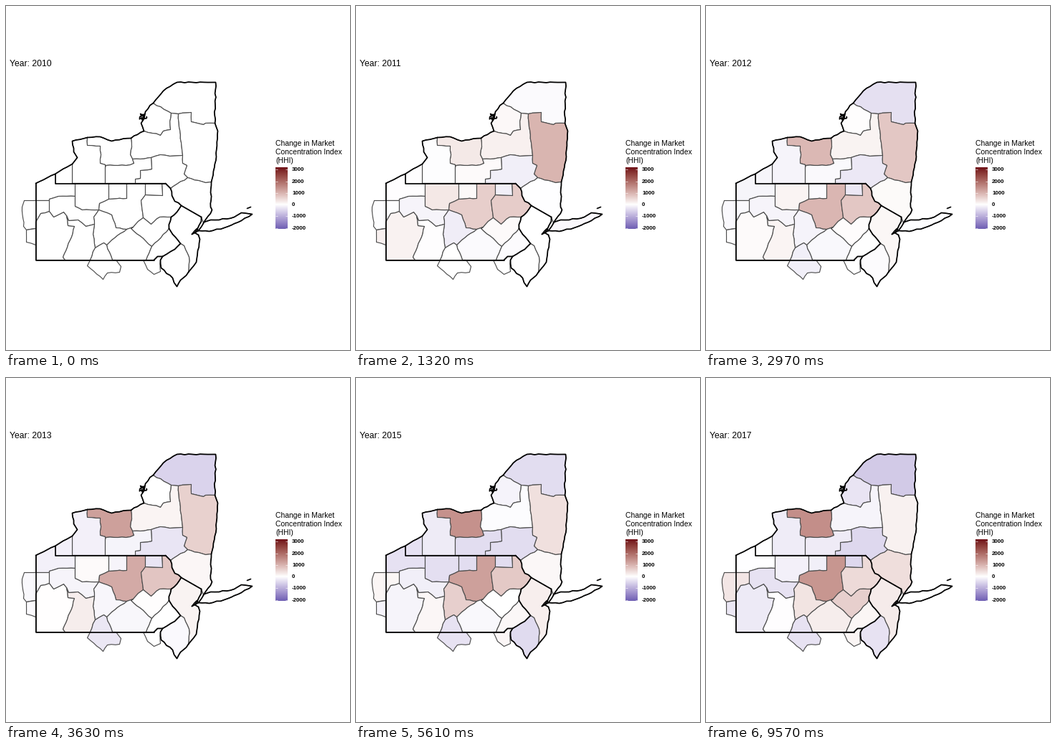
Write a matplotlib script that moves like this. It is 480 px wide and 480 px high and loops after 9.9 s.

```python
import numpy as np
import matplotlib.pyplot as plt
from matplotlib.animation import FuncAnimation
from matplotlib.patches import Polygon

SIZE, DPI = 480, 100
PX = 72 / DPI
FRAMES, YEARS = 30, 8
TOP, BOTTOM = 3215, -2080
WHITE = np.array([100, 0, 0])
HIGH = np.array([23, 41, 23])
LOW = np.array([16, 41, -66])
rng = np.random.default_rng(7)

fig = plt.figure(figsize=(SIZE / DPI, SIZE / DPI), dpi=DPI, facecolor="white")
ax = fig.add_axes([0, 0, 1, 1])


def lab_to_rgb(lab):
    fy = (lab[0] + 16) / 116
    f = np.array([fy + lab[1] / 500, fy, fy - lab[2] / 200])
    xyz = np.where(f > 6 / 29, f ** 3, (f - 4 / 29) * 3 * (6 / 29) ** 2)
    xyz = xyz * [0.9505, 1.0, 1.089]
    rgb = np.array([[3.2406, -1.5372, -0.4986],
                    [-0.9689, 1.8758, 0.0415],
                    [0.0557, -0.2040, 1.0570]]) @ xyz
    rgb = np.clip(rgb, 0, 1)
    rgb = np.where(rgb > 0.0031308, 1.055 * rgb ** (1 / 2.4) - 0.055, 12.92 * rgb)
    return tuple(np.clip(rgb, 0, 1))


def shade(value):
    """Diverging scale, blended in Lab around a white zero."""
    end = HIGH if value > 0 else LOW
    return lab_to_rgb(WHITE + (end - WHITE) * abs(value) / TOP)


def border(*xy, rough=0.4):
    """Line through a few key points, with a small random wobble between."""
    keys = np.reshape(xy, (-1, 2)).astype(float)
    pts = [keys[0]]
    for p, q in zip(keys, keys[1:]):
        length = np.hypot(*(q - p))
        normal = np.array([p[1] - q[1], q[0] - p[0]]) / length
        n = max(1, int(length / 5))
        pts += [p + (q - p) * k / n + normal * rng.normal(0, rough)
                for k in range(1, n)]
        pts.append(q)
    return [tuple(p) for p in pts]


def state(*xy, rough=0.5):
    """A border that also carries the heavy state outline."""
    line = border(*xy, rough=rough)
    ax.plot(*zip(*line), color="black", lw=1.7 * PX, zorder=3,
            solid_joinstyle="round", solid_capstyle="round")
    return line


def dist(p, q):
    return np.hypot(p[0] - q[0], p[1] - q[1])


def ring(*arcs):
    """Chain arcs into one outline, flipping each to meet the last."""
    pts = list(arcs[0])
    if len(arcs) > 1:
        near = lambda p: min(dist(p, arcs[1][0]), dist(p, arcs[1][-1]))
        if near(pts[0]) < near(pts[-1]):
            pts.reverse()
    for arc in arcs[1:]:
        flip = dist(pts[-1], arc[-1]) < dist(pts[-1], arc[0])
        pts += arc[::-1] if flip else arc
    return pts


areas = []


def area(values, *arcs):
    """values: index change by 2011, 2013, 2014 and 2017."""
    patch = Polygon(ring(*arcs), closed=True, facecolor="white",
                    edgecolor="#4d4d4d", lw=1.15 * PX, joinstyle="round", zorder=2)
    ax.add_patch(patch)
    areas.append((patch, (0, *values)))


# Shores
erie_w = state(41, 247, 68, 234)
erie_e = state(68, 234, 85, 224, 92, 220)
niagara = state(92, 220, 99, 211, 94, 203, 92, 188, 113, 183)
ontario = state(113, 183, 131, 182, 147, 188, 174, 184)
oswego = state(174, 184, 192, 174)
thousand = state(192, 174, 188, 163, 192, 157, 194, 147, 205, 135)
lawrence = state(205, 135, 219, 118, 238, 106, 292, 106, 291, 163)
hudson_n = state(291, 163, 295, 174, 293, 210, 286, 245)
hudson_s = state(286, 245, 285, 280, 287, 284, 275, 302)
angle = np.linspace(0, 2 * np.pi, 24, endpoint=False)
reach = rng.uniform(1, 6.5, 24)
state(*np.ravel(np.column_stack([190 + reach * np.cos(angle),
                                 154 + 0.8 * reach * np.sin(angle)])))

# Rivers, bays and state lines
del1 = state(222, 247, 229, 254)
del2 = state(229, 254, 231, 264, 235, 272, 244, 278)
del3 = state(244, 278, 238, 287, 230, 294)
del4 = state(230, 294, 227, 310)
del5 = state(227, 310, 232, 318, 243, 331)
del6 = state(243, 331, 235, 339, 218, 349)
del7 = state(218, 349, 211, 349, 206, 354)
ny_nj = state(244, 278, 272, 294, rough=0)
harbor = state(272, 294, 272, 300, 263, 316, 268, 319)
jersey = state(268, 319, 270, 325, 265, 357, 254, 371)
cape = state(254, 371, 243, 382, 238, 391, 232, 379, 216, 365, 215, 354, 218, 349)
island = state(268, 313, 276, 301, 285, 298, 297, 298, 318, 294, 328, 288,
               343, 290, 328, 299, 304, 309, 283, 314, 268, 313)
state(259, 318, 266, 310, 268, 313, 259, 318)
state(336, 282, 341, 280)
state(222, 247, 68, 247, 68, 234, rough=0)
state(41, 247, 41, 354, 206, 354, rough=0)

# Inner borders, north
top_w = border(205, 135, 230, 149)
top_m = border(230, 149, 240, 150)
top_e = border(240, 150, 258, 148, 258, 161, 275, 165, 278, 163, 291, 163)
bay = border(192, 174, 215, 180, 219, 174, 229, 172, 230, 149)
mohawk = border(240, 150, 241, 168, 244, 190, 246, 208)
south_e = border(246, 208, 228, 209, 215, 207, 202, 211)
south_w = border(202, 211, 187, 213, 176, 213)
lakes_e = border(174, 184, 175, 196, 173, 207, 176, 213)
lakes_s = border(138, 225, 139, 222, 167, 222, 178, 219, 176, 213)
lakes_w = border(113, 183, 113, 194, 131, 195, 131, 219, 138, 221, 138, 225)
chemung = border(202, 211, 203, 227, 187, 229, 187, 240, 180, 241, 180, 247)
otsego = border(246, 208, 246, 219, 252, 222, 248, 234, 253, 239)
greene = border(253, 239, 278, 246, 286, 245)
catskill = border(253, 239, 229, 254)

# Inner borders, south
crawford = border(96, 265, 73, 265, 60, 269, 60, 271)
elk = border(129, 284, 106, 284, 96, 279, 96, 265)
clinton = border(143, 269, 130, 275, 129, 284)
tioga = border(168, 268, 143, 269)
centre = border(129, 284, 122, 294, 123, 304)
indiana = border(123, 304, 111, 307, 100, 298, 87, 299, 84, 292)
butler = border(84, 292, 80, 287, 66, 294, 60, 286)
beaver = border(60, 286, 48, 289, 41, 301)
laurel = border(84, 292, 86, 306, 95, 307, 91, 322, 79, 350, 82, 354)
ridge = border(123, 304, 121, 318, 124, 337)
bedford = border(124, 337, 117, 354)
union = border(129, 284, 147, 291, 153, 309, 168, 311)
juniata = border(168, 311, 147, 326, 140, 333)
fulton = border(140, 333, 136, 330, 124, 337)
franklin = border(140, 333, 148, 354)
dauphin = border(177, 308, 168, 311)
schuylkill = border(203, 335, 174, 310, 177, 308)
chester = border(195, 354, 203, 335)
montour = border(191, 295, 184, 300, 177, 308)
sullivan = border(191, 295, 188, 271, 194, 263)
carbon = border(230, 294, 214, 294, 202, 304, 191, 295)
bucks = border(227, 310, 203, 335)
pines = border(243, 331, 248, 334, 255, 350, 254, 371)
mahoning = border(41, 310, 28, 312, 24, 307, 22, 280, 25, 271)
ohio = border(28, 312, 28, 329, 41, 333)
potomac = border(148, 354, 153, 354, 160, 363, 158, 371, 141, 372, 135, 381,
                 113, 362, 117, 354)
kent = border(191, 354, 197, 367, 206, 374, 215, 370, 215, 354)

# New York
area((-60, -540, -420, -660), lawrence, top_e, top_m, top_w)
area((90, 0, -150, -330), thousand, top_w, bay)
area((200, 140, -40, -130), oswego, bay, top_m, mohawk, south_e, south_w, lakes_e)
area((980, 600, 400, 180), mohawk, top_e, hudson_n, greene, otsego)
area((-200, -320, -420, -480), south_e, chemung, [(180, 247), (222, 247)],
     del1, catskill, otsego)
area((290, 1260, 1460, 1500), ontario, lakes_e, lakes_s, lakes_w)
area((-30, -180, -250, -230), niagara, lakes_w, [(138, 247), (92, 247)])
area((60, -140, -420, -240), lakes_s, south_w, chemung, [(180, 247), (138, 247)])
area((-10, 110, 100, 430), catskill, greene, hudson_s, [(272, 294)], ny_nj, del2)
area((-80, 20, 30, 0), island)

# Pennsylvania and its western fringe
area((-20, -180, -370, -10), erie_w, erie_e, [(92, 247), (96, 247)], crawford,
     [(41, 271)])
area((-30, -90, 120, 320), [(41, 271), (60, 271)], beaver, mahoning)
area((190, -60, -150, -300), [(41, 310), (28, 312)], ohio)
area((170, 10, -130, -260), beaver, butler, laurel, [(82, 354), (41, 354)])
area((-130, -130, -200, -360), crawford, elk, centre, indiana, butler)
area((300, 60, -400, -180), [(96, 247), (143, 247)], clinton, elk)
area((80, -130, -420, -200), [(143, 247), (168, 247)], tioga)
area((640, 1120, 1260, 1400), clinton, union, dauphin, montour, sullivan,
     [(194, 247), (168, 247)], tioga)
area((660, 760, 700, 480), [(194, 263), (218, 264)], [(217, 247), (222, 247)],
     del1, del2, del3, carbon, sullivan)
area((-200, -320, -420, -480), [(194, 247), (217, 247)], [(218, 264), (194, 263)])
area((60, 20, 0, 620), montour, carbon, del4, bucks, schuylkill)
area((-60, -100, -90, 230), juniata, franklin, [(148, 354), (195, 354)], chester,
     schuylkill, dauphin)
area((-220, -110, 620, 350), centre, union, juniata, fulton, ridge)
area((-20, 230, 110, -20), laurel, indiana, ridge, bedford)
area((-50, 0, 100, 120), bucks, del5, del6, del7, chester)

# South and east
area((0, -300, -360, -360), bedford, fulton, franklin, potomac)
area((0, 0, 110, 130), kent, del7)
area((0, 160, 220, 260), del3, del4, del5, pines, jersey, harbor, ny_nj)
area((0, -70, -450, -360), pines, cape, del6)


def label(x, y, text, px, **kw):
    return ax.text(x, y, text, fontsize=px * PX, family="Liberation Sans",
                   color="black", **{"va": "baseline", **kw})


year = label(4.5, 83.5, "", 12.1)

# Legend
for n, text in enumerate(("Change in Market", "Concentration Index", "(HHI)")):
    label(375.5, 194.5 + 12 * n, text, 10.4)
bar = [[shade(v)] for v in np.linspace(TOP, BOTTOM, 172)]
ax.imshow(bar, extent=(375.5, 392.5, 310.5, 224.5), aspect="auto",
          interpolation="nearest")
for v in range(-2000, 3001, 1000):
    y = 224.5 + 86 * (TOP - v) / (TOP - BOTTOM)
    for x in (375.5, 389.1):
        ax.plot([x, x + 3.4], [y, y], color="white", lw=0.6 * PX,
                solid_capstyle="butt")
    label(398.5, y - 0.5, str(v), 7.9, va="center_baseline", weight="bold")

# Whole coordinates fall on pixel centres
ax.set_xlim(-0.5, SIZE - 0.5)
ax.set_ylim(SIZE - 0.5, -0.5)
ax.axis("off")

ticks = [int(k * FRAMES / YEARS + 0.5) for k in range(YEARS)]
ticks[2:] = [int(k * FRAMES / YEARS + 0.5) for k in range(2, YEARS)]


def update(i):
    t = np.interp(i, ticks, range(YEARS))
    year.set_text(f"Year: {2010 + int(t + 0.5)}")
    for patch, values in areas:
        # values settle by 2014 and drift again from mid-2014 on
        keys, vals = (0, 1, 3, 4, 4.5, 7), (*values[:4], values[3], values[4])
        patch.set_facecolor(shade(np.interp(t, keys, vals)))
    return [year] + [patch for patch, _ in areas]


anim = FuncAnimation(fig, update, frames=FRAMES, interval=330, repeat=True)
plt.show()
```
